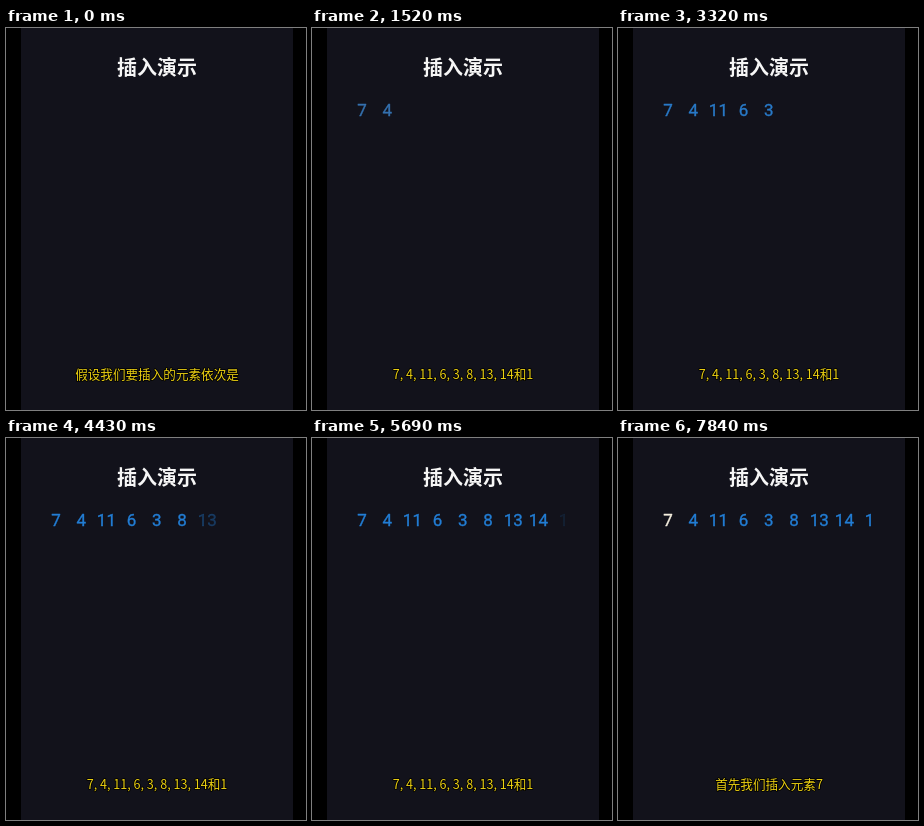
An HTML page with a canvas that plays this animation: 300x382 px, repeating every 8000 ms.

```html
<!DOCTYPE html>
<html lang="zh-CN">
<head>
<meta charset="utf-8">
<title>插入演示</title>
<style>
  html, body { margin: 0; width: 100%; height: 100%; overflow: hidden; background: #000; }
  canvas { display: block; width: 300px; height: 382px; }
</style>
</head>
<body>
<canvas id="stage" width="300" height="382"></canvas>
<script>
const ctx = document.getElementById('stage').getContext('2d');
const LOOP = 8000;
const CJK = '"Noto Sans CJK SC", "Noto Sans CJK", "Noto Sans", sans-serif';
const DIGITS = '400 17px Roboto, sans-serif';

// value, fade start, fade duration
const numbers = [
  [7, 250, 400], [4, 900, 400], [11, 1600, 480],
  [6, 2380, 390], [3, 3000, 320], [8, 3640, 380],
  [13, 4265, 420], [14, 4950, 420], [1, 5610, 380]
];
const captions = [
  [0, '假设我们要插入的元素依次是'],
  [400, '7, 4, 11, 6, 3, 8, 13, 14和1'],
  [6250, '首先我们插入元素7']
];

const progress = (t, start, length) => Math.max(0, Math.min(1, (t - start) / length));
const smooth = p => p * p * (3 - 2 * p);
const mix = (a, b, p) => a.map((v, i) => v + (b[i] - v) * p);
const rgb = c => `rgb(${c.map(Math.round).join(',')})`;

function text(str, x, y, font, color, outlineColor, outline) {
  ctx.font = font;
  if (outline) {
    ctx.strokeStyle = outlineColor;
    ctx.lineWidth = outline;
    ctx.strokeText(str, x, y);
  }
  ctx.fillStyle = color;
  ctx.fillText(str, x, y);
}

function draw(t) {
  ctx.fillStyle = '#000';
  ctx.fillRect(0, 0, 300, 382);
  ctx.fillStyle = '#12121b';
  ctx.fillRect(15, 0, 272, 382);

  text('插入演示', 151, 47, `700 20px ${CJK}`, '#f6f6f6');

  const blue = mix([52, 112, 174], [34, 125, 212], smooth(progress(t, 1600, 2800)));
  const highlight = smooth(progress(t, 6800, 1000));
  numbers.forEach(([value, start, length], i) => {
    ctx.globalAlpha = smooth(progress(t, start, length));
    const color = rgb(i === 0 ? mix(blue, [244, 238, 222], highlight) : blue);
    text(String(value), 50 + 25.2 * i, 88, DIGITS, color, color, 0.35);
  });
  ctx.globalAlpha = 1;

  const caption = captions.filter(([start]) => t >= start).pop()[1];
  text(caption, 151, 351, `500 12.6px ${CJK}`, '#ecd012', '#000', 1.6);
}

ctx.textAlign = 'center';
ctx.textBaseline = 'alphabetic';
ctx.lineJoin = 'round';

function frame() {
  draw(performance.now() % LOOP);
  requestAnimationFrame(frame);
}
frame();
</script>
</body>
</html>
```
